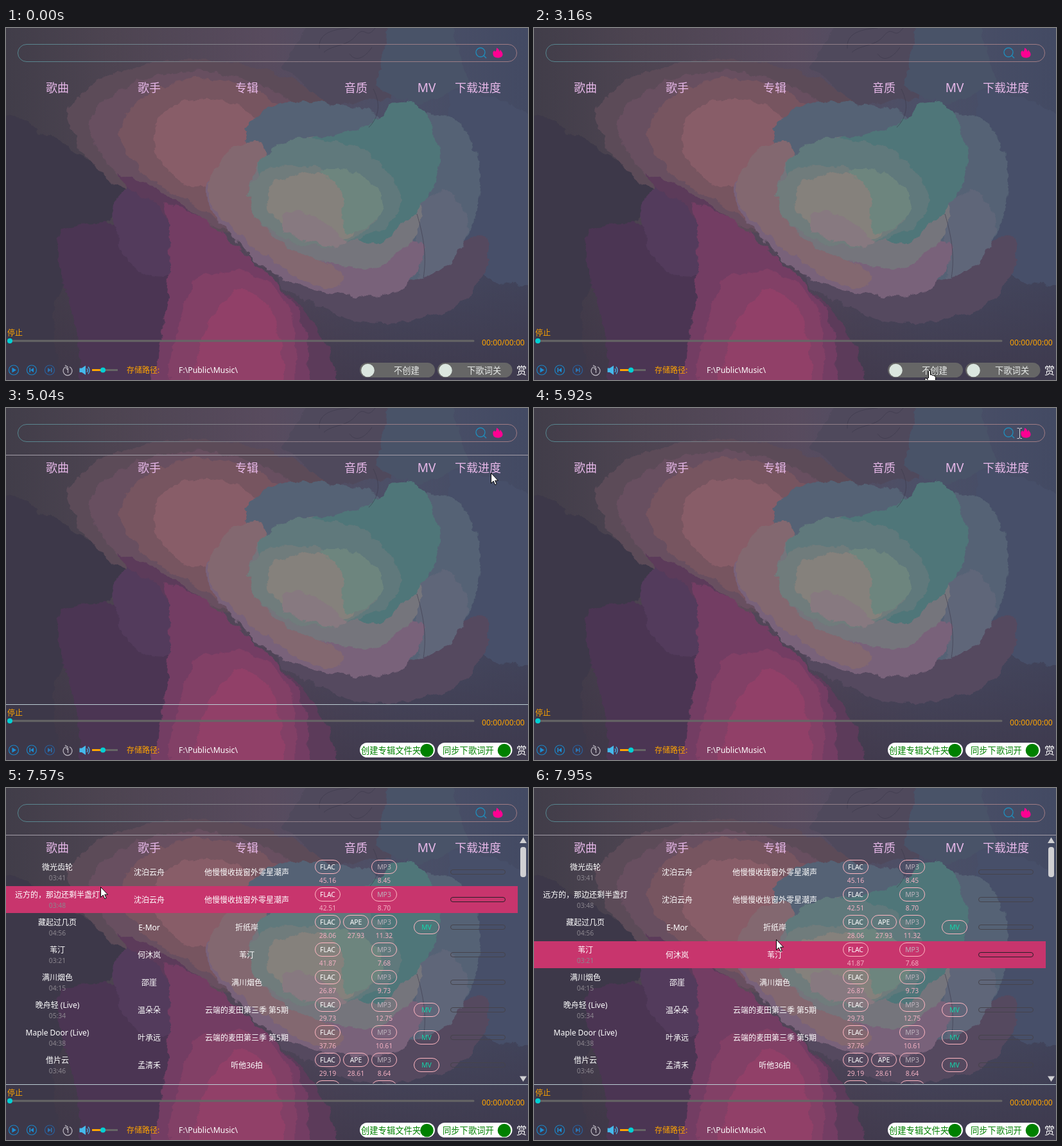
An HTML page for the animation above (8000 ms loop, 813 by 549 pixels).

```html
<!DOCTYPE html>
<html lang="zh-CN">
<head>
<meta charset="utf-8">
<title>Music downloader</title>
<style>
html, body { margin: 0; width: 100%; height: 100%; overflow: hidden; background: #443d4c; }
svg { position: absolute; left: 0; top: 0; width: 813px; height: 549px; }
#back { will-change: transform; }
text { font: 12px "Noto Sans", "Noto Sans CJK SC", "Noto Sans CJK", sans-serif; fill: #fff; }
.mid { text-anchor: middle; }
.head text { font-size: 18px; fill: #e8b9ea; }
.gold, .gold text { fill: #ffa500; }
.switch text { font-size: 13.3px; }
.off text { fill: #e8ebe9; }
.on text { fill: #008000; }
.row .time { font-size: 10.3px; fill: #8b868e; }
.row .size { font-size: 10.3px; fill: #f2b0c2; }
.row .tag { font-size: 10.4px; }
.row .dim { fill: #bdb3bd; }
.row .mv { fill: #12d9ac; }
.pill { fill: none; stroke: #ffb6c1; }
.bar { fill: none; stroke: #45434b; }
.hover { fill: none; }
.row.hot .hover { fill: #c8356d; }
.row.hot .bar { stroke: #2b1f27; }
.ring { fill: none; stroke: #1b83c4; stroke-width: 1.2; }
.hide { display: none; }
</style>
</head>
<body>
<svg id="back" viewBox="0 0 813 549">
  <defs>
    <linearGradient id="base">
      <stop offset="0" stop-color="#413d49"/>
      <stop offset=".2" stop-color="#4d4451"/>
      <stop offset=".5" stop-color="#584b5e"/>
      <stop offset=".75" stop-color="#4b5068"/>
      <stop offset="1" stop-color="#434a63"/>
    </linearGradient>
    <linearGradient id="shade" x2="0" y2="1">
      <stop offset=".5" stop-color="#3c3446" stop-opacity="0"/>
      <stop offset="1" stop-color="#3c3446" stop-opacity=".75"/>
    </linearGradient>
    <filter id="rough" x="-5%" y="-5%" width="110%" height="110%">
      <feTurbulence type="fractalNoise" baseFrequency=".045" numOctaves="4" seed="4"/>
      <feDisplacementMap in="SourceGraphic" scale="16" xChannelSelector="R" yChannelSelector="G"/>
      <feGaussianBlur stdDeviation=".7"/>
    </filter>
  </defs>
  <rect width="813" height="549" fill="url(#base)"/>
  <rect width="813" height="549" fill="url(#shade)"/>
  <g filter="url(#rough)">
    <path fill="#3d3948" d="M-20 130C60 150 110 200 170 230S120 320 90 400 80 500 90 570H-20Z"/>
    <path fill="#50495c" d="M480-20H640L600 110 500 120 430 60Z"/>
    <path fill="#4a5268" d="M600-20H690L720 90 640 120 575 90Z"/>
    <path fill="#475069" d="M690 100C750 90 790 120 830 150V400C770 410 720 380 690 330Z"/>
    <path fill="#5c4b59" d="M95 130C130 70 220 45 320 50S480 90 560 170L420 350 250 290C180 250 110 220 95 130Z"/>
    <path fill="#685060" d="M128 150C150 90 230 65 310 68S450 110 520 180L400 340 300 300C230 260 140 230 128 150Z"/>
    <path fill="#775460" d="M178 165C185 115 240 80 310 78S420 115 480 180L400 320 330 300C290 260 185 240 178 165Z"/>
    <path fill="#885d68" d="M226 170C230 130 270 110 320 110S420 165 445 215L400 270 320 245C290 265 240 225 226 170Z"/>
    <path fill="#5c3b5a" d="M175 225C230 240 300 290 350 340S500 430 520 570H170C185 450 230 320 175 225Z"/>
    <path fill="#4b3553" d="M85 315C140 295 200 300 240 345S225 480 235 570H110C135 470 60 380 85 315Z"/>
    <path fill="#523b5b" d="M190 250C230 260 260 300 270 350S215 400 190 360 150 270 190 250Z"/>
    <path fill="#733e64" d="M245 270C300 285 360 340 410 385S480 480 470 570H225C240 480 275 360 245 270Z"/>
    <path fill="#823f66" d="M290 400C330 365 390 375 425 410S450 510 450 570H250C260 510 270 440 290 400Z"/>
    <path fill="#914067" d="M335 430C365 390 410 420 420 460S440 530 430 570H285C290 510 310 465 335 430Z"/>
    <path fill="#55495f" d="M420 380C500 410 600 400 700 340S740 420 690 440 560 470 500 440 430 410 420 380Z"/>
    <path fill="#546274" d="M372 160C400 105 480 105 560 130S680 110 715 160 745 270 715 330 640 400 560 400 400 300 372 160Z"/>
    <path fill="#5f6679" d="M635 285C660 250 700 245 715 285S700 375 645 392Z"/>
    <path fill="#79627a" d="M315 240C335 220 370 190 390 190L430 320 640 330C665 360 630 425 560 420S430 400 380 355 305 275 315 240Z"/>
    <path fill="#83686f" d="M318 240C325 200 365 170 400 180L440 340C500 370 540 380 520 400S420 375 370 330 315 280 318 240Z"/>
    <path fill="#75747b" d="M378 250C390 190 440 165 520 170L650 265C655 310 615 375 555 375S375 330 378 250Z"/>
    <path fill="#507679" d="M455 180C490 160 560 170 590 130S660 125 672 180 660 270 610 315 540 330 500 270Z"/>
    <path fill="#60797b" d="M390 240C390 190 430 170 480 172S590 200 610 250 570 330 520 335 395 310 390 240Z"/>
    <path fill="#707b7b" d="M378 255C385 220 420 210 460 215S575 230 585 265 550 330 510 340 375 320 378 255Z"/>
    <path fill="#85817b" d="M408 280C405 240 430 230 470 225S550 230 550 270 550 325 525 328 425 315 408 280Z"/>
    <path fill="#6d857e" d="M490 222C530 210 570 235 585 262S560 320 535 320 550 260 490 222Z"/>
    <path fill="#877980" d="M430 290C460 280 500 300 525 325S470 340 435 320Z"/>
  </g>
  <g fill="none" stroke="#3c3a4c" stroke-opacity=".6">
    <path d="M488 32C486 10 505 2 535 0M495 38C510 25 530 30 545 12S560 20 575 0M535 40C545 55 560 45 570 30M572 95C585 120 580 140 565 155M640 290C652 330 655 360 650 390"/>
  </g>
</svg>

<svg id="ui" viewBox="0 0 813 549">
  <defs>
    <linearGradient id="edge">
      <stop offset="0" stop-color="#56858f"/>
      <stop offset=".5" stop-color="#8d7f88"/>
      <stop offset="1" stop-color="#a07c84"/>
    </linearGradient>
    <clipPath id="view"><rect y="74" width="813" height="387"/></clipPath>
  </defs>

  <rect x="18.5" y="25.5" width="777" height="27" rx="13.5" fill="none" stroke="url(#edge)"/>
  <g fill="none" stroke="#218bb8" stroke-width="1.4"><circle cx="739" cy="38" r="7"/><path d="M744 43L748 47"/></g>
  <path fill="#ff0092" d="M764 31C767 32 768 34 768.5 37L770 34C772 37 774 39 773.5 42S770 46.5 766 46.5 759 45 758.5 41 759 37 760.5 35L762 37C764 35 764 33 764 31Z"/>

  <g id="list" clip-path="url(#view)">
    <g id="rows"></g>
    <g fill="#d0d0d3">
      <path d="M805.5 77L811 86H800ZM805.5 458L811 449.500H800Z"/>
      <rect x="801" y="92" width="9" height="47" rx="4"/>
    </g>
  </g>

  <g class="head mid">
    <text x="80" y="100">歌曲</text><text x="223" y="100">歌手</text>
    <text x="375" y="100">专辑</text><text x="545" y="100">音质</text>
    <text x="655" y="100" style="font-size:19px">MV</text><text x="735" y="100">下载进度</text>
  </g>
  <g id="lines"><path stroke="#a39da8" d="M0 73.500H813"/><path stroke="#bccdd4" d="M0 462.500H813"/></g>

  <g class="gold">
    <text x="2" y="480">停止</text>
    <text x="741" y="495" style="font-size:12.2px">00:00/00:00</text>
    <text x="188" y="538">存储路径:</text>
  </g>
  <path stroke="#666" stroke-width="3" stroke-linecap="round" d="M6 488H728"/>
  <circle cx="6" cy="488" r="4" fill="#00d0d4"/>

  <g class="ring"><circle cx="12" cy="533.500" r="7.500"/><circle cx="40" cy="533.500" r="7.500"/><circle cx="68" cy="533.500" r="7.500" stroke="#255f9c" style="stroke:#285f9d"/></g>
  <g fill="#1b8fd6">
    <path d="M9.500 529.500L16 533.500 9.500 537.500ZM43 530V537L38 533.500ZM36.500 530H38V537H36.500Z"/>
    <path fill="#2a74b4" d="M65 530V537L70 533.500ZM70 530H71.500V537H70Z"/>
  </g>
  <g fill="none" stroke="#bdb9c2" stroke-width="1.2"><path d="M93 528.500A7 7 0 1 0 99 528.500M92 526L96 528.500 93 531M94.500 532.500L96.500 531V538"/></g>
  <path fill="#45b9ec" d="M114.500 530.500H118L124 526.500V541L118 537H114.500Z"/>
  <path fill="none" stroke="#45b9ec" stroke-width="1.3" d="M126 531Q128 534 126 537M128 528.500Q132 534 128 539.500"/>
  <path stroke="#666" stroke-width="3" d="M151 533.500H174"/>
  <path stroke="#ffa500" stroke-width="3" d="M134 533.500H151"/>
  <circle cx="151" cy="533.500" r="4" fill="#00d0d4"/>
  <text x="269" y="538" style="font-size:12.3px">F:\Public\Music\</text>

  <g id="switches"></g>
  <text x="795" y="540" style="font-size:16px">赏</text>

  <g id="cursor">
    <path id="arrow" fill="#fff" stroke="#000" d="M.5 .500V16.500L4.200 13 6.800 18.800 9.200 17.700 6.700 12.200H11.500Z"/>
    <path id="hand" fill="#fff" stroke="#000" d="M-1.500 12V1.500Q-1.500 0 0 0T1.500 1.500V7Q4 5.500 4.500 8 7 6.500 7.500 9 9.500 8 9.500 10.500V15L7.500 21H-2.500L-7 14.500Q-8 11.500-5.500 12L-3 14.500V12"/>
    <path id="beam" fill="none" stroke="#d6d2d8" d="M-3.500-7.500H-1L.5-6.500 2-7.500H4M-3.500 8.500H-1L.5 7.500 2 8.500H4M.5-6.500V7.500"/>
  </g>
</svg>

<script>
const LOOP = 8000, ROW_TOP = 110, ROW_STEP = 43;
const $ = id => document.getElementById(id);
const show = (el, on) => el.classList.toggle('hide', !on);

const long = '他慢慢收拢窗外零星潮声', season = '云端的麦田第三季 第5期';
// title, time, artist, album, FLAC, APE, MP3, has MV
const songs = [
  ['微光齿轮', '03:41', '沈泊云舟', long, '45.16', '', '8.45'],
  ['远方的，那边还剩半盏灯', '03:48', '沈泊云舟', long, '42.51', '', '8.70'],
  ['藏起过几页', '04:56', 'E-Mor', '折纸岸', '28.06', '27.93', '11.32', 1],
  ['苇汀', '03:21', '何沐岚', '苇汀', '41.87', '', '7.68'],
  ['满川烟色', '04:15', '邵崖', '满川烟色', '26.87', '', '9.73'],
  ['晚舟轻 (Live)', '05:34', '温朵朵', season, '29.73', '', '12.75', 1],
  ['Maple Door (Live)', '04:38', '叶承远', season, '37.76', '', '10.61', 1],
  ['借片云', '03:46', '孟清禾', '听他36拍', '29.19', '28.61', '8.64', 1],
  ['', '', '', '', ' ', '', ' ']
];

const label = (x, y, s, cls = '') => `<text x="${x}" y="${y}" class="${cls}">${s}</text>`;
const pill = (x, y, s, cls = '') =>
  `<rect class="pill" x="${x - 19.5}" y="${y + .5}" width="39" height="21" rx="10.5"/>` + label(x, y + 15, s, 'tag ' + cls);
const format = (x, y, name, size, cls) =>
  size ? pill(x, y + 2, name, cls) + label(x, y + 38, size, 'size') : '';

$('rows').innerHTML = songs.map(([title, time, artist, album, flac, ape, mp3, mv], i) => {
  const y = ROW_TOP + ROW_STEP * i;
  return `<g class="row mid"><rect class="hover" y="${y}" width="797" height="42"/>` +
    label(80, y + 18, title) + label(80, y + 34, time, 'time') +
    label(223, y + 26, artist) + label(375, y + 26, album) +
    format(501, y, 'FLAC', flac) + format(545, y, 'APE', ape) + format(589, y, 'MP3', mp3, 'dim') +
    (mv ? pill(655, y + 10, 'MV', 'mv') : '') +
    `<rect class="bar" x="692.5" y="${y + 17.5}" width="85" height="7" rx="3.5"/></g>`;
}).join('');
const rows = [...$('rows').children];

const face = (cls, x, w, fill, knobX, knob, textX, s) =>
  `<g class="${cls}"><rect x="${x}" y="522" width="${w}" height="23" rx="11.5" fill="${fill}"/>` +
  `<circle cx="${knobX}" cy="534" r="10.3" fill="${knob}"/>${label(textX, 539, s)}</g>`;
const toggle = (x, w, offX, offText, onX, onText) => '<g class="switch">' +
  face('off', x, w, '#666', x + 12.5, '#dbe6df', offX, offText) +
  face('on', x, w, '#fff', x + w - 12.5, '#008000', onX, onText) + '</g>';
$('switches').innerHTML =
  toggle(551, 117, 604, '不创建', 553, '创建专辑文件夹') +
  toggle(672, 116.5, 718, '下歌词关', 680, '同步下歌词开');
const switches = [...$('switches').children];
const switchOn = [3300, 3980], listOn = 6290;

// start, end, number of steps, then [step, x, y] waypoints
const moves = [
  [940, 1730, 12, [[0, 470, 541], [3, 485, 440], [7, 520, 290], [11, 527, 243]]],
  [2040, 2790, 11, [[0, 524, 247], [3, 560, 390], [6, 610, 533], [8, 606, 470], [10, 606, 435]]],
  [2860, 3160, 5, [[0, 608, 445], [2, 612, 510], [4, 616, 534]]],
  [3300, 3750, 7, [[0, 616, 534], [6, 752, 536]]],
  [3980, 4720, 11, [[0, 752, 536], [2, 742, 526], [4, 717, 406], [7, 715, 270], [10, 735, 190]]],
  [4790, 5300, 8, [[0, 738, 180], [4, 760, 75], [7, 766, 35]]],
  [5840, 5920, 2, [[0, 758, 34], [1, 756, 39]]],
  [6910, 7710, 12, [[0, 754, 43], [2, 670, 95], [6, 310, 185], [9, 147, 154], [11, 200, 132]]],
  [7790, 7950, 3, [[0, 255, 160], [1, 318, 205], [2, 377, 236]]]
];

function cursorAt(t) {
  const move = moves.filter(m => t >= m[0]).pop();
  if (!move) return null;
  const [start, end, count, path] = move;
  const k = Math.min(count - 1, Math.floor((t - start + 8) * (count - 1) / (end - start)));
  const i = Math.max(1, path.findIndex(p => p[0] >= k));
  const [ka, xa, ya] = path[i - 1], [kb, xb, yb] = path[i];
  const u = (k - ka) / (kb - ka);
  return { x: Math.round(xa + (xb - xa) * u), y: Math.round(ya + (yb - ya) * u) };
}

function shapeAt({ x, y }) {
  if (y > 25 && y < 53) return x < 760 ? 'beam' : 'hand';
  return y > 521 && x > 550 && x < 789 ? 'hand' : 'arrow';
}

function draw() {
  const t = performance.now() % LOOP;
  const c = cursorAt(t), before = cursorAt(t - 75);
  show($('cursor'), c);
  if (c) {
    $('cursor').setAttribute('transform', `translate(${c.x} ${c.y})`);
    const shape = shapeAt(c);
    for (const id of ['arrow', 'hand', 'beam']) show($(id), id === shape);
  }
  // the list frame reacts one step late
  show($('lines'), before && before.y > 73 && before.y < 462);
  show($('list'), t >= listOn);
  const hot = c && c.x < 797 ? Math.floor((c.y + 4 - ROW_TOP) / ROW_STEP) : -1;
  rows.forEach((row, i) => row.classList.toggle('hot', i === hot));
  switches.forEach((s, i) => {
    const on = t >= switchOn[i];
    show(s.children[0], !on);
    show(s.children[1], on);
  });
  requestAnimationFrame(draw);
}
draw();
</script>
</body>
</html>
```
